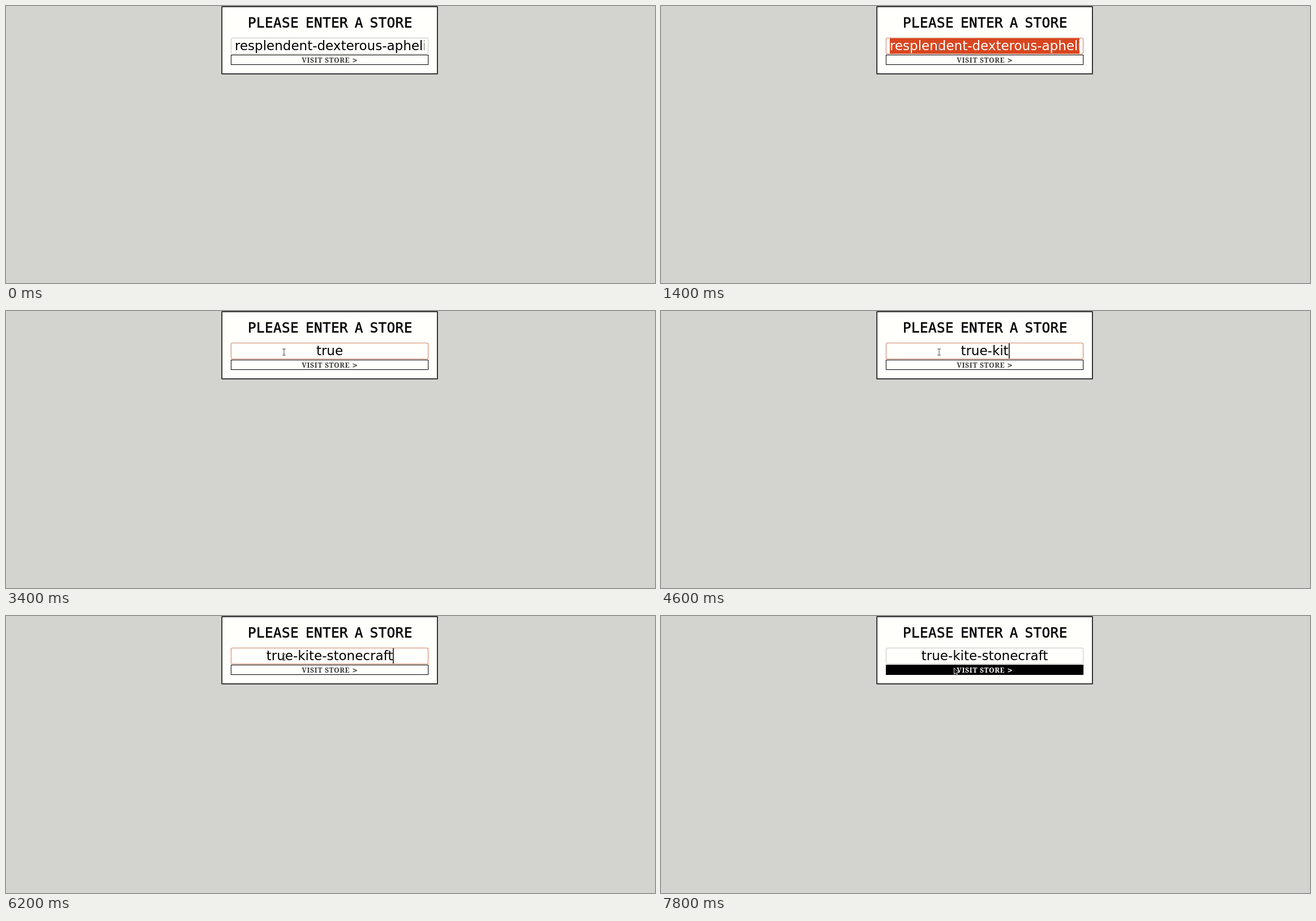
These frames come from a looping animation (1146x489 px, 8 s). An HTML page:

```html
<!DOCTYPE html>
<html lang="en">
<head>
<meta charset="utf-8">
<title>Store picker</title>
<style>
  html, body { margin: 0; width: 100%; height: 100%; overflow: hidden; background: #d3d4cf; }
  svg { display: block; }
  text { white-space: pre; }
  .title { font: 24.2px "DejaVu Sans Mono", monospace; letter-spacing: .45px; word-spacing: -3.2px; stroke: #000; stroke-width: .6px; }
  .entry { font: 23px "DejaVu Sans", sans-serif; }
  .label { font: 700 12.2px "Noto Serif", serif; letter-spacing: .7px; }
  .chevron { font: 700 11.5px "DejaVu Sans", sans-serif; letter-spacing: 0; }
</style>
</head>
<body>
<svg width="1146" height="489" viewBox="0 0 1146 489">
  <clipPath id="fieldClip"><rect x="404" y="57" width="335" height="27"/></clipPath>
  <clipPath id="selectionClip"><rect id="selectionArea" x="404" y="57" height="27"/></clipPath>

  <rect x="381.25" y="1.25" width="380.5" height="118.5" fill="#fffffc" stroke="#000" stroke-width="1.5"/>
  <text class="title" x="427" y="37.5">PLEASE ENTER A STORE</text>

  <rect id="field" x="397.5" y="56.5" width="348" height="28" rx="2.5" fill="#fffffc"/>
  <g clip-path="url(#fieldClip)"><text id="entry" class="entry" y="78"></text></g>
  <g clip-path="url(#selectionClip)">
    <rect x="404" y="57" width="335" height="27" fill="#d9461f"/>
    <text id="selectedEntry" class="entry" x="404" y="78" fill="#fff"></text>
  </g>
  <rect id="caret" y="57" width="1.5" height="27"/>

  <rect x="397.5" y="86.5" width="348" height="17" fill="#fffffc" stroke="#000"/>
  <rect id="hoverFill" x="397" y="86" width="349"/>
  <text id="label" class="label" x="571.5" y="99.5" text-anchor="middle">VISIT STORE <tspan class="chevron">&gt;</tspan></text>

  <path id="arrow" d="M.5 .5V12L3.2 9.6L5.2 14.2L7 13.4L5 9H8.6Z" stroke="#fff" stroke-width=".9"/>
  <g id="beam" fill="none">
    <path d="M-3 -5.5H3M0 -5.5V5.5M-3 5.5H3" stroke="#fff" stroke-width="2" opacity=".5"/>
    <path d="M-3 -5.5H3M0 -5.5V5.5M-3 5.5H3" stroke="#444"/>
  </g>
</svg>
<script>
const LOOP = 8000, BUTTON_HEIGHT = 18, CENTER = 571.5;
const OLD_STORE = 'resplendent-dexterous-aphelion';
const NEW_STORE = 'true-kite-stonecraft';
const $ = id => document.getElementById(id);

// [time, typed letters]
const typing = [[2400, 2], [2800, 3], [3400, 4], [4000, 5], [4400, 7], [4600, 8], [5000, 10],
  [5200, 11], [5400, 13], [5600, 15], [5800, 17], [6000, 19], [6200, 20]];
// [time, pointer, x, y]
const pointers = [[400, 'arrow', 455, 177], [600, 'arrow', 472, 103], [800, 'arrow', 484, 95],
  [1000, 'beam', 491, 72.5], [7200, 'beam', 500, 85], [7400, 'arrow', 511, 85],
  [7600, 'arrow', 516, 90], [7800, 'arrow', 517, 91]];
// [time, height of the button's hover fill]
const hovers = [[0, 0], [800, 9], [1000, 6], [1200, 0], [7400, 9], [7600, 16], [7800, BUTTON_HEIGHT]];

const at = (steps, t) => steps.findLast(step => step[0] <= t);
const show = (id, visible) => $(id).setAttribute('visibility', visible ? 'visible' : 'hidden');
const set = (id, attributes) => {
  for (const name in attributes) $(id).setAttribute(name, attributes[name]);
};

function drawField(t) {
  const focused = t >= 1200 && t < 7800;
  set('field', { stroke: focused ? '#dfa48f' : '#c4c5bd', 'stroke-width': focused ? 1.6 : 1 });

  const typed = at(typing, t);
  const entry = $('entry');
  entry.textContent = typed ? NEW_STORE.slice(0, typed[1]) : OLD_STORE;
  const width = entry.getComputedTextLength();
  entry.setAttribute('x', typed ? CENTER - width / 2 : 404);

  const selected = t < 1200 || typed ? 0 : t < 1400 ? 137 : 335;
  set('selectionArea', { width: selected });

  const blinkedOff = t >= 3400 && t < 4000;
  show('caret', typed && t < 7200 && !blinkedOff);
  set('caret', { x: Math.round(CENTER + width / 2) });
}

function drawButton(t) {
  const height = at(hovers, t)[1];
  const channel = Math.round(56 + (255 - 56) * height / BUTTON_HEIGHT);
  set('hoverFill', { height });
  set('label', { fill: `rgb(${channel},${channel},${channel})` });
}

function drawPointer(t) {
  const pointer = at(pointers, t);
  for (const id of ['arrow', 'beam']) show(id, pointer && pointer[1] === id);
  if (pointer) set(pointer[1], { transform: `translate(${pointer[2]} ${pointer[3]})` });
}

function render() {
  const t = performance.now() % LOOP;
  drawField(t);
  drawButton(t);
  drawPointer(t);
  requestAnimationFrame(render);
}

$('selectedEntry').textContent = OLD_STORE;
render();
</script>
</body>
</html>
```
